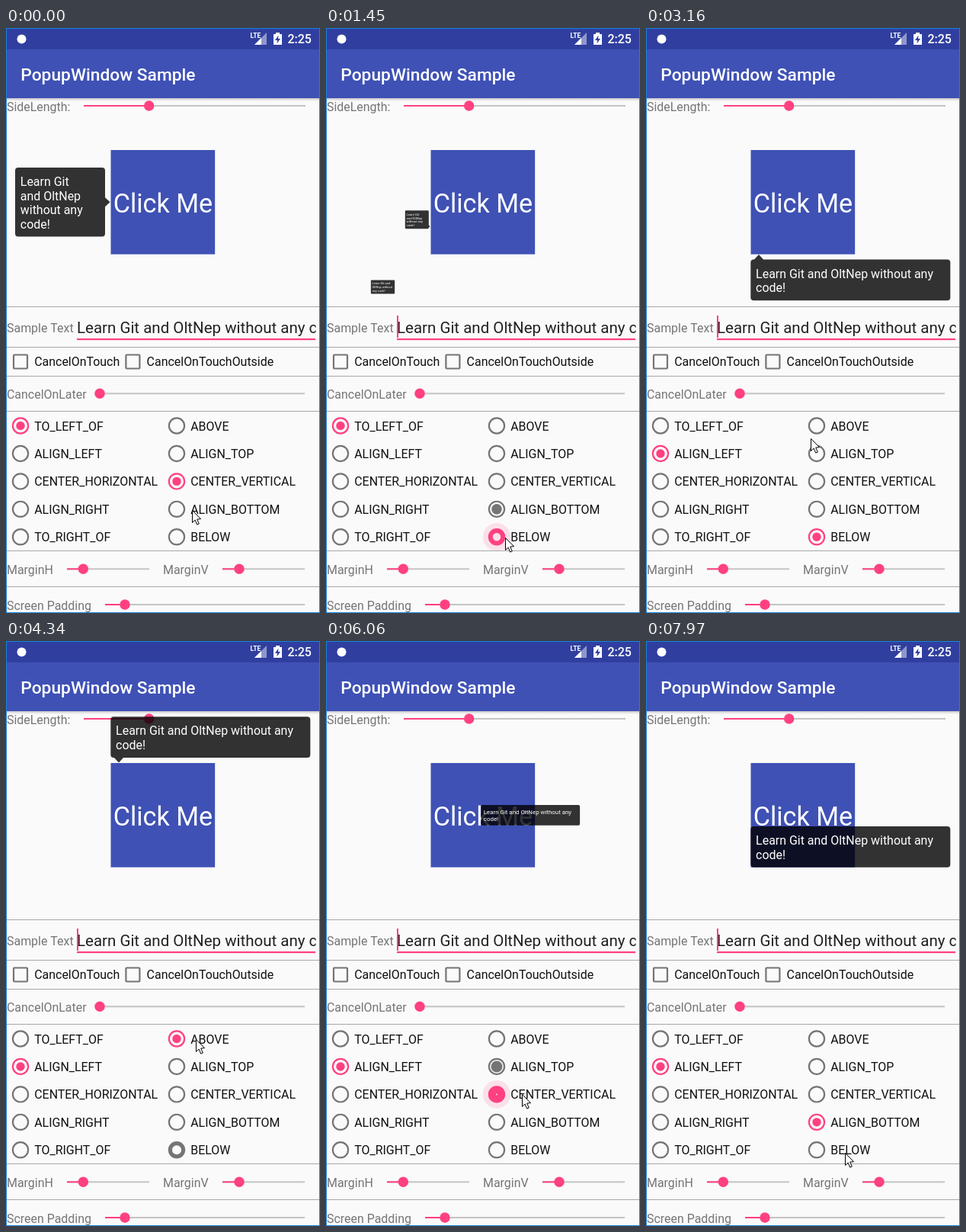
These frames come from a looping animation (412x767 px, 8 s). An HTML page with a canvas:

```html
<!DOCTYPE html>
<html>
<head>
<meta charset="utf-8">
<title>PopupWindow Sample</title>
<style>
html, body { margin: 0; width: 100%; height: 100%; overflow: hidden; }
canvas { display: block; width: 412px; height: 767px; }
</style>
</head>
<body>
<canvas id="stage"></canvas>
<script>
const W = 412, H = 767, LOOP = 8000, STEP = 90;
const DP = 410 / 360; // a 360dp wide screen inside a one pixel window border
const PINK = '#ff4081', GRAY = '#757575', BLUE = '#3f51b5', INK = '#111';
const canvas = document.getElementById('stage');
const g = canvas.getContext('2d');
const dpr = window.devicePixelRatio || 1;
canvas.width = W * dpr;
canvas.height = H * dpr;

const MESSAGE = 'Learn Git and OltNep without any code!';
const LABELS = [
  'TO_LEFT_OF', 'ALIGN_LEFT', 'CENTER_HORIZONTAL', 'ALIGN_RIGHT', 'TO_RIGHT_OF',
  'ABOVE', 'ALIGN_TOP', 'CENTER_VERTICAL', 'ALIGN_BOTTOM', 'BELOW'];
const NARROW = ['Learn Git', 'and OltNep', 'without any', 'code!'];
const MEDIUM = ['Learn Git and', 'OltNep without', 'any code!'];
const WIDE = ['Learn Git and OltNep without any', 'code!'];

// One popup per state; the next event replaces it.
const wide = (y, side) => ({ x: 137.3, y, w: 262, h: 53.7, lines: WIDE, side, at: 148 });
const POPUPS = [
  { x: 12, y: 183, w: 118, h: 90.5, lines: NARROW, side: 'right', at: 228.3 },
  { x: 12, y: 206, w: 118, h: 90.5, lines: NARROW, side: 'right', at: 285 },
  { x: 12, y: 303.5, w: 125, h: 72, lines: MEDIUM },
  wide(303.6, 'top'), wide(99.3, 'bottom'), wide(160, ''), wide(201.5, ''), wide(243, '')];

// lead: how far the radio animation has run at t; delay: when the new popup starts growing
const EVENTS = [
  { t: 360, off: 7, on: 8 },
  { t: 1450, off: 8, on: 9, lead: 75, delay: -50 },
  { t: 2530, off: 0, on: 1 },
  { t: 3890, off: 9, on: 5 },
  { t: 5070, off: 5, on: 6 },
  { t: 5970, off: 6, on: 7, lead: 70 },
  { t: 7070, off: 7, on: 8, lead: 120 }];

const POINTER = [
  [0, 244, 632], [180, 243, 629], [720, 243, 629], [1080, 241, 665], [1170, 235, 668],
  [1720, 235, 668], [2170, 81, 561], [2260, 80, 560], [2800, 80, 560], [3160, 216, 538],
  [3250, 230, 529], [3340, 240, 524], [3520, 249, 522], [4400, 249, 522], [4610, 244, 543],
  [4790, 244, 565], [5300, 244, 565], [5610, 257, 594], [6250, 257, 594], [6510, 260, 627],
  [7500, 260, 627], [7790, 261, 671], [LOOP, 261, 671]];

const clamp = v => Math.max(0, Math.min(1, v));

function text(str, x, midY, size = 14 * DP, color = GRAY, weight = 400) {
  g.font = `${weight} ${size}px Roboto, sans-serif`;
  g.fillStyle = color;
  g.fillText(str, x, midY + size * 0.355);
}

function rect(x, y, w, h, color) {
  g.fillStyle = color;
  g.fillRect(x, y, w, h);
}

function disc(x, y, r, color) {
  g.fillStyle = color;
  g.beginPath();
  g.arc(x, y, r, 0, 7);
  g.fill();
}

function ring(x, y, hole, color) {
  const outer = 11.2;
  g.strokeStyle = color;
  g.lineWidth = outer - hole;
  g.beginPath();
  g.arc(x, y, (outer + hole) / 2, 0, 7);
  g.stroke();
}

function polygon(points, color) {
  g.fillStyle = color;
  g.beginPath();
  points.forEach(([x, y]) => g.lineTo(x, y));
  g.closePath();
  g.fill();
}

function slider(x, end, thumb, y) {
  rect(x, y - 1, end - x, 2, '#c4c4c4');
  rect(x, y - 1, thumb - x, 2, PINK);
  disc(thumb, y, 6.7, PINK);
}

function checkbox(midX, label) {
  g.strokeStyle = GRAY;
  g.lineWidth = 2.2;
  g.beginPath();
  g.roundRect(midX - 9, 428.5, 18, 18, 1);
  g.stroke();
  text(label, midX + 16 * DP, 437.8, 14 * DP, INK);
}

function bars() {
  const shadow = g.createLinearGradient(0, 92, 0, 96);
  shadow.addColorStop(0, 'rgba(0,0,0,.2)');
  shadow.addColorStop(1, 'rgba(0,0,0,0)');
  rect(0, 92, W, 4, shadow);
  rect(0, 0, W, 28, '#303f9f');
  rect(0, 28, W, 64, BLUE);
  text('PopupWindow Sample', 1 + 16 * DP, 61, 20 * DP, '#fff', 500);
  disc(20.5, 14.5, 6, '#fff');
  text('LTE', 320.5, 10, 8.5, '#fff', 700);
  polygon([[326, 22], [342, 22], [342, 6]], '#8f98cc');
  polygon([[326, 22], [335, 22], [335, 13]], '#fff');
  rect(354, 6, 5, 3, '#fff');
  rect(351, 8, 11, 14, '#fff');
  polygon([[357.5, 9.5], [353, 16], [356, 16], [355.5, 20.5], [360, 14], [357, 14]], '#303f9f');
  text('2:25', 369.5, 14.7, 14 * DP, '#fff', 500);
}

function form(caretOn) {
  rect(0, 0, W, H, '#fafafa');
  text('SideLength:', 1, 103.5);
  slider(102, 393, 187.7, 102);
  rect(137.5, 160, 120 * DP, 120 * DP, BLUE);
  g.textAlign = 'center';
  text('Click Me', 206, 229.7, 30 * DP, '#fff');
  g.textAlign = 'left';

  for (const y of [365, 418, 456, 502, 685, 732]) rect(0, y, W, 1, '#a8a8a8');

  text('Sample Text', 1, 393);
  g.save();
  g.beginPath();
  g.rect(93, 370, 313.5, 45);
  g.clip();
  text(MESSAGE, 93, 392.7, 18 * DP, '#212121');
  g.restore();
  rect(93, 407, 313, 2.2, PINK);
  if (caretOn) rect(93, 377, 2, 29, PINK);

  checkbox(19, 'CancelOnTouch');
  checkbox(166.4, 'CancelOnTouchOutside');
  text('CancelOnLater', 1, 480);
  slider(123, 392, 123, 479.3);
  text('MarginH', 1, 710);
  slider(80, 188, 101.3, 709.3);
  text('MarginV', 206, 710);
  slider(284, 392, 306, 709.3);
  text('Screen Padding', 1, 757);
  slider(130, 392, 156, 756);
}

function radio(i, selected, event, u) {
  const x = i < 5 ? 19 : 224, y = 521.5 + (i % 5) * 32 * DP;
  const color = selected ? PINK : GRAY;
  const v = u + (event?.lead ?? 90);
  let hole = 9, dot = selected ? 5.7 : 0;
  if (event?.on === i) {
    g.globalAlpha = 0.14 * clamp((350 - u) / 200);
    disc(x, y, 16 * DP, PINK);
    g.globalAlpha = 1;
    if (v < 180) {
      hole *= 1 - v / 180;
      dot = 0;
    } else {
      dot += 2 * clamp((330 - v) / 150);
    }
  } else if (event?.off === i) {
    if (v < 250) dot = 5.7 + 1.8 * clamp(v / 120);
    else hole *= clamp((v - 250) / 430);
  }
  ring(x, y, hole, color);
  if (dot) disc(x, y, dot, color);
  text(LABELS[i], x + 16 * DP, y + 0.4, 14 * DP, INK);
}

function popup({ x, y, w, h, lines, side, at }, scale) {
  if (scale <= 0) return;
  const tip = 6.5, half = 6;
  const px = side === 'right' ? x + w + tip : x + w / 2;
  const py = side === 'top' ? y - tip : side === 'bottom' ? y + h + tip : y + h / 2;
  g.save();
  g.translate(px, py);
  g.scale(scale, scale);
  g.translate(-px, -py);
  g.fillStyle = 'rgba(0,0,0,.8)';
  g.beginPath();
  g.roundRect(x, y, w, h, 4);
  if (side === 'right') {
    g.moveTo(x + w, at - half);
    g.lineTo(px, at);
    g.lineTo(x + w, at + half);
  } else if (side) {
    const base = side === 'top' ? y : y + h, dir = side === 'top' ? 1 : -1;
    g.moveTo(at + half * dir, base);
    g.lineTo(at, py);
    g.lineTo(at - half * dir, base);
  }
  g.fill();
  lines.forEach((line, i) => text(line, x + 6.8, y + 18.3 + i * 18.6, 14 * DP, '#fff'));
  g.restore();
}

function pointer(t) {
  const next = Math.max(1, POINTER.findIndex(p => p[0] >= t));
  const [t0, x0, y0] = POINTER[next - 1], [t1, x1, y1] = POINTER[next];
  const k = (t - t0) / (t1 - t0);
  g.save();
  g.translate(x0 + (x1 - x0) * k + 0.5, y0 + (y1 - y0) * k + 0.5);
  polygon([[0, 0], [0, 16], [3.7, 12.6], [6.2, 18.6], [8.8, 17.5], [6.2, 11.6], [11, 11.2]], '#fff');
  g.strokeStyle = '#000';
  g.lineWidth = 1;
  g.stroke();
  g.restore();
}

function draw(now) {
  const clock = now % LOOP;
  const past = EVENTS.filter(e => e.t <= clock);
  const event = past[past.length - 1];
  const start = event?.t ?? 0;
  const u = Math.floor((clock - start) / STEP) * STEP;
  const t = start + u;

  const selected = new Set([0, 7]);
  for (const { off, on } of past) {
    selected.delete(off);
    selected.add(on);
  }

  g.setTransform(dpr, 0, 0, dpr, 0, 0);
  form(Math.floor((t - 130) / 490) % 2 === 0);
  LABELS.forEach((_, i) => radio(i, selected.has(i), event, u));
  bars();
  g.strokeStyle = '#1883d7';
  g.lineWidth = 1;
  g.strokeRect(0.5, 0.5, W - 1, H - 1);
  if (event) {
    popup(POPUPS[past.length - 1], 1 - (u + 59) / 80);
    popup(POPUPS[past.length], clamp((u - (event.delay ?? -9)) / 200));
  } else {
    popup(POPUPS[0], 1);
  }
  pointer(t);
}

const origin = performance.now();
function tick() {
  draw(performance.now() - origin);
  requestAnimationFrame(tick);
}
tick();
</script>
</body>
</html>
```
